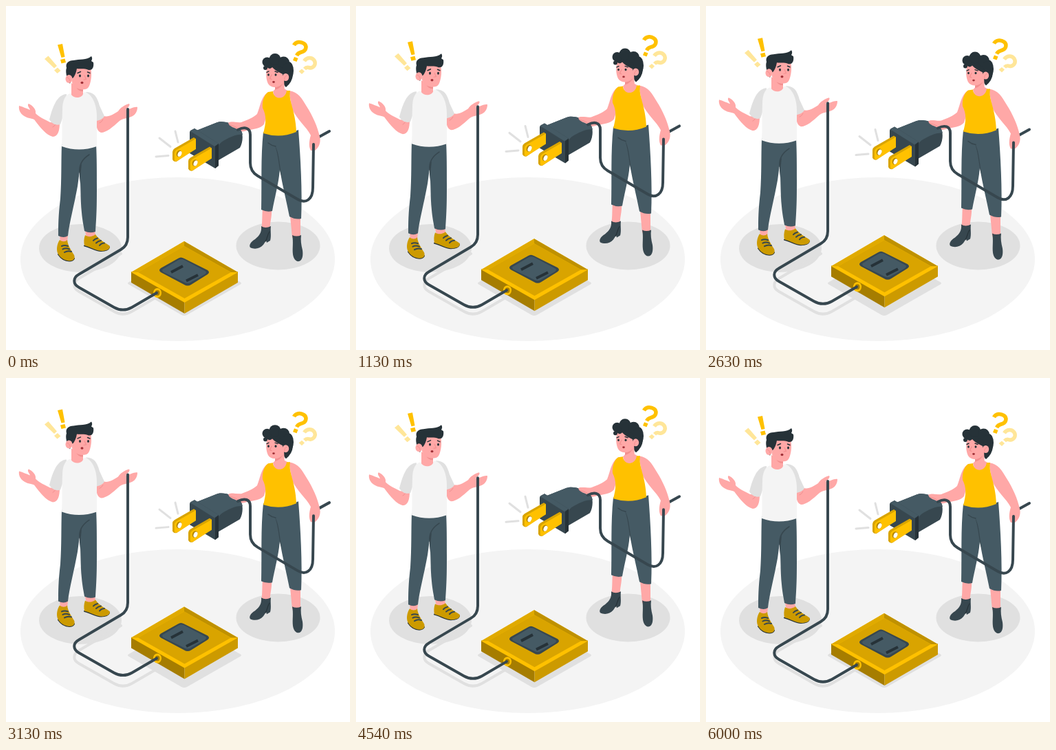
Write an HTML page with a canvas that moves like this. It is 500 by 500 pixels and loops after 6.04 s.

```html
<!DOCTYPE html>
<html lang="en">
<head>
<meta charset="utf-8">
<title>Unplugged</title>
<style>
  html, body { margin: 0; width: 100%; height: 100%; overflow: hidden; background: #fff; }
  canvas { display: block; width: 100vw; height: 100vh; }
</style>
</head>
<body>
<canvas id="stage"></canvas>
<script>
const SIZE = 500, LOOP = 6040, RISE = 10;
const canvas = document.getElementById('stage');
const ctx = canvas.getContext('2d');
const ratio = window.devicePixelRatio || 1;
canvas.width = canvas.height = SIZE * ratio;

const SKIN = '#ffa8a7', BLUSH = '#f28f8f', INK = '#263238', DARK = '#37474f', SLATE = '#455a64';
const GOLD = '#ffc100', PALE = '#ffe699', OCHRE = '#cc9a00', GREY = '#e0e0e0';

const paths = new Map();
function path(d) {
  if (!paths.has(d)) paths.set(d, new Path2D(d));
  return paths.get(d);
}
function fill(color, d) {
  ctx.fillStyle = color;
  ctx.fill(path(d));
}
function line(color, width, d, cap = 'round') {
  ctx.strokeStyle = color;
  ctx.lineWidth = width;
  ctx.lineCap = cap;
  ctx.lineJoin = 'round';
  ctx.stroke(path(d));
}
function oval(color, x, y, rx, ry = rx, turn = 0) {
  ctx.fillStyle = color;
  ctx.beginPath();
  ctx.ellipse(x, y, rx, ry, turn, 0, Math.PI * 2);
  ctx.fill();
}
function shifted(dx, dy, draw) {
  ctx.save();
  ctx.translate(dx, dy);
  draw();
  ctx.restore();
}

const CORD = 'M177 150V336C177 345 174 350 167 354L106 390C97 395 97 404 106 409L157 438C166 443 174 443 183 438L219 417';

function floor() {
  oval('#f4f4f4', 249.5, 368, 228.5, 119);
  oval(GREY, 108, 352, 60, 35);
  oval(GREY, 395.5, 348.5, 61, 35);
  fill(GREY, 'M179 401L256 357Q259 355 262 357L340 401Q344 403 340 405L263 449Q259 451 255 449L179 405Q175 403 179 401Z');
  shifted(0, 6, () => line(GREY, 4, 'M167 354L106 390C97 395 97 404 106 409L157 438C166 443 174 443 183 438L219 417'));
}

function outlet() {
  fill('#a67d00', 'M182 386L259.5 430V447L182 402Z');
  fill(OCHRE, 'M259.5 430L337 386V402L259.5 447Z');
  fill(GOLD, 'M259 342L337 387L259.5 431L182 387Z');
  fill('#e0aa00', 'M259 342L182 387L192 387L259 349Z');
  fill('#bf9100', 'M259 342L337 387L327 387L259 349Z');
  fill('#d9a400', 'M259 349L327 387L259.5 425L192 387Z');
  fill(DARK, 'M225 381L250 367Q254 364 259 367L293 384Q297 387 293 390L269 405Q264 408 259 405L225 387Q221 384 225 381Z');
  fill(SLATE, 'M229 382L251 369Q255 367 259 369L289 385Q293 387 289 390L268 402Q264 404 260 402L229 387Q225 384 229 382Z');
  line(INK, 4, 'M240 387L257 378M262 399.500L279 391', 'butt');
  oval(GOLD, 220, 417, 6, 7);
  oval('#a67d00', 220, 417, 3.5, 4);
}

function manHead() {
  fill(SKIN, 'M95 112V129C99 135 110 134 112 128V119Z');
  fill(BLUSH, 'M102 118Q107 122 112 121V124Q105 124 102 118Z');
  fill(SKIN, 'M97 90H123C125 98 124 109 121 116C119 121 114 122 108 121C102 120 98 116 96 111Z');
  fill(INK, 'M93 113C88 105 86 95 88 90C86 83 91 79 98 79C107 77 117 79 124 73C126 76 125 78 124 80L127 82C128 88 126 94 120 93C113 90 108 92 103 91C102 97 100 101 98 104L95 106Z');
  oval(SKIN, 91.5, 106, 5, 6);
  line(BLUSH, 1, 'M89 104Q93 105 93 109');
  oval(INK, 107.5, 101.500, 1.5, 1.9);
  oval(INK, 119.5, 101.500, 1.5, 1.9);
  line(INK, 1.5, 'M104 97.500L108.500 95.500M118.500 96L122 97.500');
  line(BLUSH, 1.1, 'M114 101L116.500 106.500L113 107');
  oval('#a02f36', 110.5, 111.5, 2, 1.7);
}

function man() {
  fill(GOLD, 'M75 56.500L82 55L85.500 74L80.500 75ZM79 78L85.500 76.500L87 82L80.500 83.500Z');
  fill(PALE, 'M56 77L61.500 72.500L74 87L70 90.500ZM70 93.500L75 89.500L79.500 94L74.500 98Z');

  fill(SKIN, 'M78 333H90L89 344H79ZM115 327H129L131 337H117Z');
  line(INK, 2, 'M76 361C80 367 86 370.500 92 370.500C96 370.500 98 369 99 367M114 348.500C122 350 130 356 138 356C145 356 149 354 150 351');
  fill(OCHRE, 'M78 340C74 346 73 354 75 359C78 365 84 370 92 370.500C98 370.500 101 367 99 362C95 355 90 349 89 340C86 343 82 343 78 340Z');
  fill(OCHRE, 'M115 333C113 338 113 344 114 348C122 350 130 355.500 138 356C146 356 151 354 151 349C148 346 136 341 130 332C125 336 119 336 115 333Z');
  line(DARK, 2, 'M81 349Q85 347 90 349M82.500 353.500Q87 351 92 353.500M85 358Q90 355 95 357');
  line(DARK, 2, 'M127 341Q129 338.500 133 337.500M131 344.500Q134 341.500 138 341M136 348Q138 345 143 344.500');

  fill(SLATE, 'M81 201C80 230 81 250 79 280C76 305 76 320 76 334Q84 338 90 334C92 315 99 290 104 262L107 240C109 265 108 280 110 300C111 312 113 320 114 327Q122 331 130 328C132 300 132 285 132 265C132 240 132 220 131 201Q106 212 81 201Z');
  line(DARK, 1.5, 'M107 242C106 232 110 223 121 216');
  fill(DARK, 'M107 235L107 258L110 229Z');

  fill(SKIN, 'M64 169C57 165 47 161 43 156C44 150 39 145 33 142C30 144 34 148 35 151C30 149 23 146 19 145C18 151 21 156 25 159C30 163 36 163 41 165C50 177 59 188 68 190C76 190 78 180 78 170Z');
  fill(SKIN, 'M132 164L142 160C149 162 157 157 163 153C166 148 172 144 179 142C181 145 177 147 174 151C181 150 186 146 191 147C191 153 188 158 184 160C176 164 170 163 165 167C155 176 146 184 138 184C131 181 131 173 132 164Z');
  line(BLUSH, 1, 'M68 176Q71 174 74 170M136 170Q139 169 141 165');
  fill(GREY, 'M88 128C74 129 68 146 63 165C67 172 74 174 79 172L87 148Z');
  fill(GREY, 'M116 125C128 125 132 131 136 145L143 160C141 164 136 166 132 167L122 140Z');
  fill('#f4f4f4', 'M94 127C87 128 82 136 82 151C81 170 82 188 81 204Q106 213 132 204L132 165C133 147 127 128 114 125Q103 137 94 127Z');
  manHead();
}

function questions() {
  line(GOLD, 5.5, 'M418.500 57C421 52 428 51 433 54.500C438 58 436 64 432 66C428 68 425 67 422.500 72', 'butt');
  fill(GOLD, 'M419 74L424.500 76L422.500 81L417 79Z');
  line(PALE, 5.5, 'M433.500 80C437 74.500 444 74 448 79C451 84 448 89 443 90C439 90 437.500 87.500 434 91.500', 'butt');
  fill(PALE, 'M430 91.500L434 95L430 99L425.500 95Z');
}

function womanHead() {
  oval(INK, 411, 94, 7, 13);
  fill(INK, 'M402 108Q404 116 407 118Q416 111 417 100L404 92Z');
  fill(SKIN, 'M391 112V125C390 133 400 136 405 125L404 106Z');
  fill(BLUSH, 'M391 118Q398 117 403 110Q401 119 391 122Z');
  fill(SKIN, 'M380 88C377 97 378 107 381 113C384 118 391 119 396 117C402 115 405 109 405 102L402 88Z');
  fill(INK, 'M379 89C383 92 385 91 387 89C392 95 399 97 402 99V105L405 104L412 96L410 84L398 78L380 80Z');
  oval(INK, 379.5, 81.5, 7);
  oval(INK, 377, 90, 3);
  oval(INK, 391, 77.5, 8.5);
  oval(INK, 403.5, 82, 8.5);
  oval(INK, 409, 90, 7);
  oval(SKIN, 406.5, 103.500, 4.7, 5.5);
  line(BLUSH, 1, 'M408 101Q404 103 405 107');
  oval(INK, 381.500, 100, 1.4, 1.8);
  oval(INK, 392, 100, 1.5, 1.8);
  line(INK, 1.4, 'M379 96.500L382 95M391 95L395 96.500');
  line(BLUSH, 1.1, 'M386 100L383.500 105.500L386 106.500');
  oval('#a02f36', 389, 110.5, 1.8, 1.4);
}

function prong() {
  fill('#d9a400', 'M242 212Q242 209 245 207L273 191L276 193V207L248 226Q244 227 242 223Z');
  fill(GOLD, 'M245 214Q245 211 248 209L276 193V208L249 225Q245 227 245 223Z');
  oval('#b38600', 251.5, 214.5, 3.7, 5, 0.4);
  oval('#fff', 252.500, 215, 2.7, 4.2, 0.4);
}

function plug() {
  line(GREY, 3, 'M223 192L239 204.500M246 182L250 198M218 219L236 217.500');
  fill(DARK, 'M277 181L306 169.500C315 166 332 171 340 179C345 184 345 197 340 206L309 224Z');
  fill(SLATE, 'M277 181L306 169.500C315 166 332 171 340 179Q343 182 344 187C335 186 324 191 313 198L309 202Z');
  fill(DARK, 'M267 184Q267 181 270 180L274 178L309 200V232L304 236L267 214Z');
  fill(SLATE, 'M268 182L274 178L309 200L303 204Z');
  fill(INK, 'M304 204L309 200V232L304 236Z');
  prong();
  shifted(23, 13.5, prong);
}

function woman() {
  questions();
  line(DARK, 4, 'M470 182L450 193');

  fill(SKIN, 'M373 294H386C387 307 383 315 384 325H371C373 313 372 304 373 294ZM413 305H428L428 337H416Z');
  fill(DARK, 'M371 320C372 329 368 334 362 339C355 343 353 348 355 351C361 354 369 353 374 347L378 341L379 344L384 341C386 334 384 327 385 320Q377 324 371 320Z');
  fill(DARK, 'M416 333C418 343 416 352 417 361C418 368 422 372 426 371C431 370 432 362 431 355C429 347 428 340 429 333Q422 336 416 333Z');
  line(INK, 1.2, 'M377 342C380 338 380 332 383 328');

  fill(SLATE, 'M374 183C370 220 372 260 371 296Q379 300 387 298C390 280 396 260 398 238C402 262 408 285 412 306Q421 311 429 309C431 270 428 220 425 180Q398 193 374 183Z');
  line(DARK, 1.5, 'M381 199Q386 203 392 204');
  fill(DARK, 'M391 203C397 213 397 228 401 250L398 238C396 226 395 214 391 203Z');

  fill(SKIN, 'M382 125C371 130 370 145 365 157C360 162 350 166 342 169C335 170 327 167 323 170C323 175 326 178 330 180C338 184 343 183 350 181C360 179 370 178 375 172L382 150Z');
  fill(SKIN, 'M411 123C425 125 430 134 437 146C446 160 453 176 456 190C458 198 455 206 449 210L443 210C440 205 440 198 443 188C437 176 423 165 416 150Z');
  fill(SKIN, 'M388 124L392 120H404L411 124L405 138H392Z');
  fill(GOLD, 'M381 125L388 124C389 137 406 137 408 123L413 123C410 137 421 152 422 183Q398 193 374 185C378 170 379 160 373 148C372 138 376 128 381 125Z');
  womanHead();
  plug();
  fill(SKIN, 'M323 170C329 167 336 170 343 170L348 178Q341 176 338 180C333 177 325 176 323 170Z');
  line(BLUSH, 1, 'M325 173Q331 174 336 177');
  line(DARK, 4, 'M337 180C347 175 355 177 355 187V228C355 236 359 243 366 247L424 281C436 288 446 281 446 264L447 201');
}

function frame(now) {
  const t = Math.min(now % LOOP, 6000);
  // Linear rise and fall over one period
  const lift = period => -RISE * (1 - Math.abs(1 - 2 * (t % period) / period));
  ctx.setTransform(ratio, 0, 0, ratio, 0, 0);
  ctx.fillStyle = '#fff';
  ctx.fillRect(0, 0, SIZE, SIZE);
  floor();
  shifted(0, lift(6000), () => {
    man();
    outlet();
    line(DARK, 4, CORD);
  });
  shifted(0, lift(3000), woman);
}

const start = performance.now();
function tick() {
  frame(performance.now() - start);
  requestAnimationFrame(tick);
}
tick();
</script>
</body>
</html>
```
